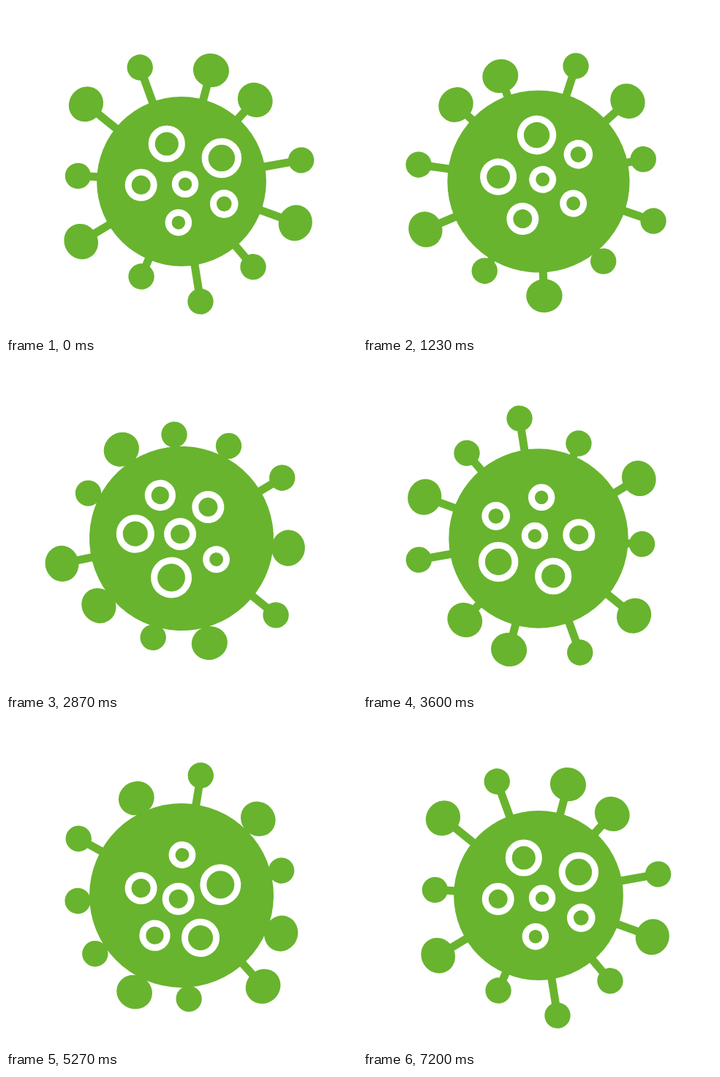
An HTML page with a canvas for the animation above (7.23 s loop, 480x450 px).

```html
<!DOCTYPE html>
<html lang="en">
<head>
<meta charset="utf-8">
<title>Virus</title>
<style>
  html, body { margin: 0; width: 100%; height: 100%; overflow: hidden; background: #fff; }
  canvas { display: block; }
</style>
</head>
<body>
<canvas id="stage" width="480" height="450"></canvas>
<script>
const ctx = document.getElementById('stage').getContext('2d');
const GREEN = '#68b42e';
const LOOP = 7230, LAST = 180, BEAT = 30;
const RAD = Math.PI / 180;

// angle, shortest reach, longest reach, beat of the peak, big head, ease strength
const spikes = [
  [110, 140.4, 166.2, 28.7, false],
  [75.1, 144.3, 164.2, 23.5, true],
  [47.9, 144.5, 168, 9.3, true],
  [10.1, 140.4, 166.2, 0, false],
  [-20, 146.8, 168, 25.9, true],
  [-50, 140.4, 166.2, 22.4, false, 0.8],
  [-81, 140.8, 166.2, 0, false],
  [-112.9, 140.4, 166.3, 17.4, false],
  [-149.1, 145, 167.5, 23.6, true],
  [176.9, 141, 166.3, 12.6, false],
  [141, 146.8, 168, 0.3, true]
];

// angle, distance, smallest and largest outer radius, beat of the peak
const rings = [
  [111.4, 55.3, 24.9, 29, 17.8],
  [30.2, 63.5, 25.5, 29.2, 22.3],
  [185, 55.5, 18.3, 22, 29.5],
  [-36.5, 6.3, 18, 22, 11.8],
  [-27.7, 65.8, 18.4, 21.3, 8.7],
  [-94.2, 56.3, 18, 22, 11.8]
];

// cubic-bezier(k, 0, 1 - k, 1)
function ease(x, k) {
  let lo = 0, hi = 1, t = 0.5;
  for (let i = 0; i < 24; i++) {
    t = (lo + hi) / 2;
    const s = 1 - t;
    const bx = 3 * s * s * t * k + 3 * s * t * t * (1 - k) + t * t * t;
    if (bx < x) lo = t; else hi = t;
  }
  return t * t * (3 - 2 * t);
}

// eased swing between min and max, highest at the peak
function swing(n, min, max, peak, k = 0.58) {
  const d = (((n - peak) % BEAT) + BEAT) % BEAT;
  const u = 1 - Math.min(d, BEAT - d) / (BEAT / 2);
  return min + (max - min) * ease(u, k);
}

// 25 steps a second, shown on a 30 Hz clock
const startOf = n => Math.round(Math.round(n * 1.2) * 10 / 3) * 10;

function stepAt(ms) {
  let n = Math.min(LAST, Math.floor(ms / 40) + 1);
  while (n > 0 && startOf(n) > ms) n--;
  return n;
}

function blob(x, y, rx, ry = rx) {
  ctx.beginPath();
  ctx.ellipse(x, y, rx, ry, 0, 0, Math.PI * 2);
}

function drawSpike(n, [angle, min, max, peak, big, k]) {
  const reach = swing(n, min, max, peak, k);
  ctx.save();
  ctx.rotate(-angle * RAD);
  ctx.fillRect(100, -5.5, reach - 100, 11);
  if (big) blob(reach, 0, 22.9, 24.7); else blob(reach, 0, 17.7);
  ctx.fill();
  ctx.restore();
}

function drawRing(n, [angle, dist, min, max, peak]) {
  const outer = swing(n, min, max, peak);
  blob(dist * Math.cos(angle * RAD), -dist * Math.sin(angle * RAD), outer - 4.5);
  ctx.stroke();
}

function draw(n) {
  ctx.fillStyle = '#fff';
  ctx.fillRect(0, 0, 480, 450);
  ctx.save();
  ctx.translate(240, 240);
  ctx.rotate(-2 * n * RAD);
  ctx.fillStyle = GREEN;
  ctx.strokeStyle = '#fff';
  ctx.lineWidth = 9;
  spikes.forEach(s => drawSpike(n, s));
  blob(0, 0, 119.3 + 7.5 * Math.cos((n - 13.5) * 18 * RAD));
  ctx.fill();
  rings.forEach(r => drawRing(n, r));
  ctx.restore();
}

const begin = performance.now();
function tick() {
  draw(stepAt((performance.now() - begin) % LOOP));
  requestAnimationFrame(tick);
}
tick();
</script>
</body>
</html>
```
